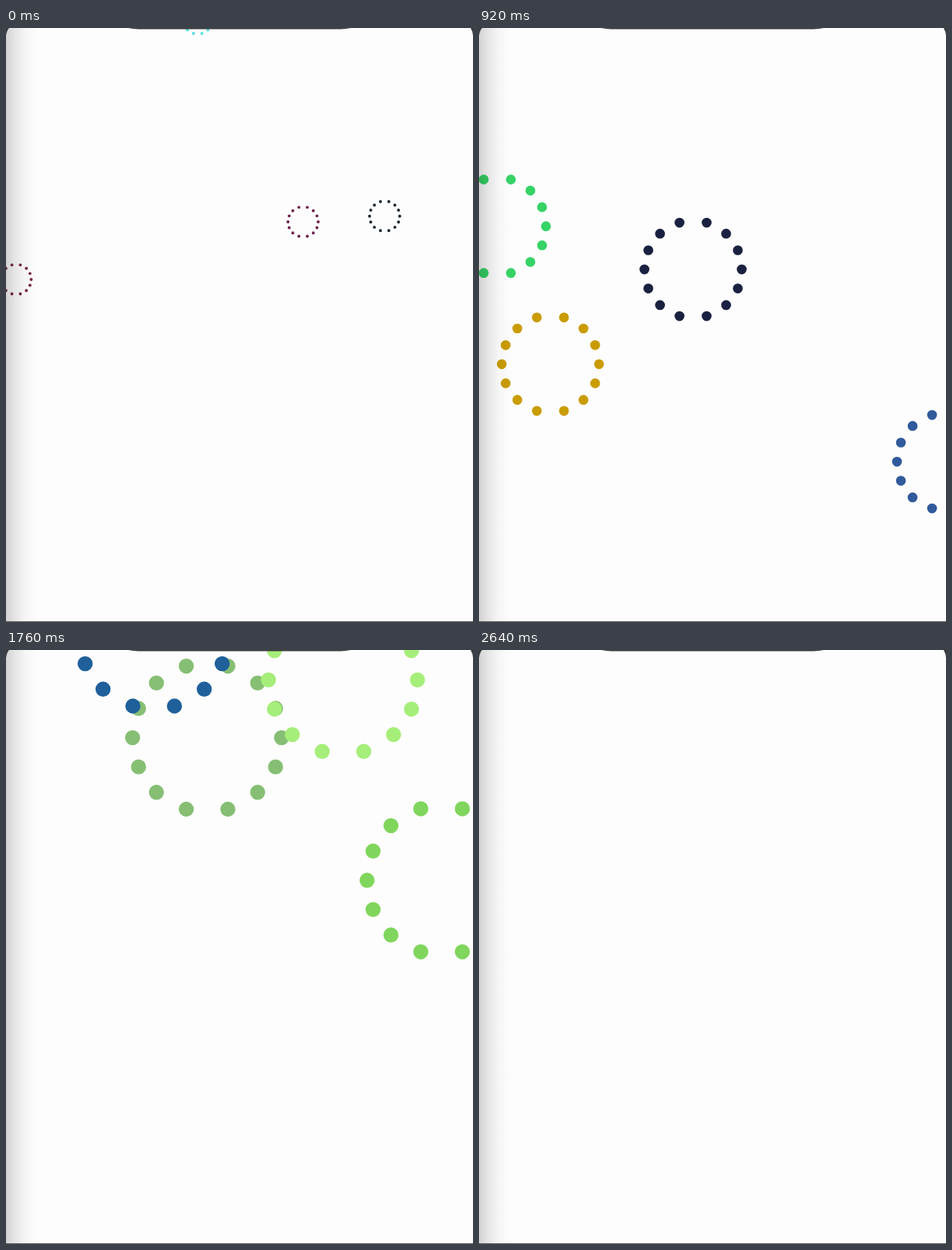
An HTML page with a canvas for the animation above (2720 ms loop, 600 px wide and 763 px high).

```html
<!DOCTYPE html>
<html lang="en">
<head>
<meta charset="utf-8">
<title>Dot bursts</title>
<style>
  html, body { margin: 0; width: 100%; height: 100%; overflow: hidden; background: #fefdfe; }
  canvas, svg { position: absolute; left: 0; top: 0; display: block; }
</style>
</head>
<body>
<canvas id="stage" width="600" height="763"></canvas>
<svg width="600" height="763" viewBox="0 0 600 763">
  <defs>
    <linearGradient id="shade">
      <stop offset="0" stop-opacity=".17"/>
      <stop offset=".25" stop-opacity=".1"/>
      <stop offset=".6" stop-opacity=".03"/>
      <stop offset="1" stop-opacity="0"/>
    </linearGradient>
  </defs>
  <rect width="42" height="763" fill="url(#shade)"/>
  <g fill="#3a393b">
    <path d="M157 0Q163 1.4 170 1.4H430Q437 1.4 443 0Z"/>
    <path d="M0 0H4Q1 3 0 10Z"/>
    <path d="M597 0H600V10Q599.5 4 597 0Z"/>
    <rect y="762" width="600" height="1" fill="#5c5a5d"/>
  </g>
</svg>
<script>
const LOOP = 2720, STEP = 40;
const GROW = 700, LIFE = 712;
const RADIUS = 140, DOT = 0.1015;

const bursts = [
  { start: -218, rings: [
    [379.7, 247, '#70264e'], [484.5, 239.7, '#1f2b33'],
    [11, 321, '#7b2946'], [244.3, -13.7, '#52e2e0']] },
  { start: 490, rings: [
    [268.7, 303.7, '#1a2140'], [85.4, 425.5, '#c99c00'],
    [17.2, 248.3, '#36d366'], [593.2, 550.7, '#305a9b']] },
  { start: 1204, rings: [
    [248.6, 102.9, '#86bf74'], [423.2, 28.7, '#a6ee7a'],
    [549.9, 286.1, '#80d65c'], [180, -29.6, '#1f609b']] },
  { start: 1920, rings: [
    [455.2, 175.4, '#93a8cb'], [303.9, 265.7, '#0fc95b'],
    [360.6, 143.6, '#e31af5'], [85.4, 446.1, '#6688c6']] }
];

// Dot directions: one quadrant, mirrored to all four.
const rad = Math.PI / 180;
const dirs = [[1, 0], [-1, 0]];
for (const deg of [23.1, 47.2, 73.8]) {
  const x = Math.cos(deg * rad), y = Math.sin(deg * rad);
  dirs.push([x, y], [-x, y], [x, -y], [-x, -y]);
}

const ctx = document.getElementById('stage').getContext('2d');

// cubic-bezier(.42, 0, 1, 1)
function easeIn(p) {
  if (p >= 1) return 1;
  let lo = 0, hi = 1;
  for (let i = 0; i < 24; i++) {
    const u = (lo + hi) / 2, v = 1 - u;
    if (1.26 * u * v * v + 3 * u * u * v + u * u * u < p) lo = u; else hi = u;
  }
  return lo * lo * (3 - 2 * lo);
}

function drawRing(x, y, color, radius) {
  const dot = radius * DOT;
  ctx.fillStyle = color;
  ctx.beginPath();
  for (const [dx, dy] of dirs) {
    // Each dot hangs from its top-left corner, so the ring drifts as it grows.
    const cx = x + dot + dx * radius, cy = y + dot + dy * radius;
    ctx.moveTo(cx + dot, cy);
    ctx.arc(cx, cy, dot, 0, 2 * Math.PI);
  }
  ctx.fill();
}

function draw(time) {
  ctx.clearRect(0, 0, 600, 763);
  for (const { start, rings } of bursts) {
    const age = time - start;
    if (age <= 0 || age >= LIFE) continue;
    const radius = RADIUS * easeIn(age / GROW);
    for (const [x, y, color] of rings) drawRing(x, y, color, radius);
  }
}

let origin = null;
function tick(now) {
  if (origin === null) origin = now;
  const time = (now - origin + 4) % LOOP;
  draw(Math.floor(time / STEP) * STEP);
  requestAnimationFrame(tick);
}
draw(0);
requestAnimationFrame(tick);
</script>
</body>
</html>
```
